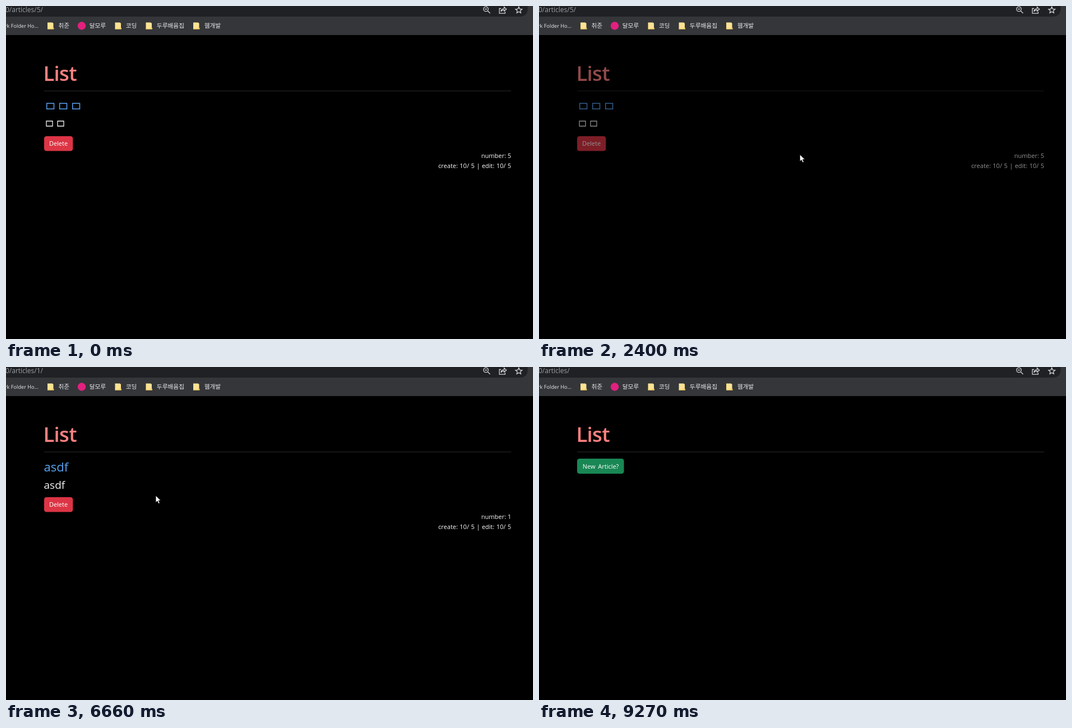
Write an HTML page that moves like this. It is 940 px wide and 596 px high and loops after 9.74 s.

```html
<!DOCTYPE html>
<html lang="ko">
<head>
<meta charset="utf-8">
<title>Articles</title>
<style>
html, body { margin: 0; width: 100%; height: 100%; overflow: hidden; background: #000; }
svg { display: block; width: 940px; height: 596px; }
text { font: 11px "Open Sans", "Noto Sans", sans-serif; fill: #fff; white-space: pre; }
.mid { text-anchor: middle; }
.end { text-anchor: end; }
.gap { word-spacing: 1px; }
.gap2 { word-spacing: 2px; }
.url { font-size: 12px; fill: #9aa0a6; }
.mark { font: 10.7px "Noto Sans CJK KR", "Noto Sans CJK", sans-serif; fill: #e8eaed; }
.tab { font-size: 9.2px; fill: #e8eaed; }
.h1 { font-size: 36.5px; font-weight: 600; letter-spacing: -.7px; fill: #ff8080; }
.name { font-size: 22px; fill: #5aa2f2; }
.body { font-size: 19px; fill: #f4f4f4; }
.warn { font-size: 13.6px; font-weight: 700; fill: #ff8080; }
.dark { fill: #212529; }
.hr { stroke: #2c2c2c; stroke-width: 1; }
.icon { fill: none; stroke: #d0d3d7; stroke-width: 1.3; }
</style>
</head>
<body>
<svg viewBox="0 0 940 596">
  <defs>
    <g id="folder">
      <path d="M0 0H8.5L10.5 1.5V12H0Z" fill="#fde293"/>
      <path d="M8 9.5H11.5V12H0V11H8Z" fill="#f5cb58"/>
    </g>
    <clipPath id="view"><rect y="52" width="940" height="544"/></clipPath>
  </defs>
  <rect width="940" height="596"/>

  <g id="page">
    <text class="h1" x="66.5" y="134">List</text>
    <path class="hr" d="M68 152H901"/>

    <g id="detail">
      <g id="boxes" fill="none">
        <path d="M72.7 174.2h12.8v10h-12.8zm23 0h12.8v10h-12.8zm23 0h12.8v10h-12.8z" stroke="#5aa2f2" stroke-width="1.5"/>
        <path d="M72 206h11v9h-11zm20 0h11v9h-11z" stroke="#f4f4f4" stroke-width="1.3"/>
      </g>
      <g id="words">
        <text class="name" x="67.5" y="187">asdf</text>
        <text class="body" x="67.5" y="218">asdf</text>
      </g>
      <rect id="ring" x="65.5" y="230.5" width="56" height="31.5" rx="6.5" fill="#e15361" opacity=".5"/>
      <rect id="del" x="68" y="233" width="51.3" height="26.5" rx="4.3"/>
      <text class="mid" x="93.5" y="250">Delete</text>
      <text class="end" id="num" x="901" y="272"></text>
      <text class="end" x="901" y="289.5" style="word-spacing:.6px">create: 10/ 5 | edit: 10/ 5</text>
    </g>

    <g id="item">
      <text class="name" x="67.5" y="187">asdf</text>
      <rect id="watch" x="68" y="208.5" width="84" height="27.5" rx="4.3"/>
      <text class="mid gap2 dark" x="110" y="226">Watch Detail</text>
      <path class="hr" d="M68 247.3H901"/>
    </g>
    <g id="add">
      <rect x="68" y="259.5" width="83.5" height="27" rx="4.3" fill="#198754"/>
      <text class="mid gap2" x="110" y="277">New Article?</text>
    </g>
  </g>

  <rect id="shade" y="52" width="940" height="544"/>

  <g clip-path="url(#view)">
    <g id="modal">
      <g id="card">
        <rect x="307" y="72.3" width="355" height="136.2" rx="5.5" fill="#fff"/>
        <path d="M307 117.3H662M307 157.5H662" stroke="#dee2e6" stroke-width=".9"/>
        <text class="warn" x="318" y="101">Warning</text>
        <path d="M639.5 89.5l10.4 10.4m0-10.4l-10.4 10.4" stroke="#6b6b6b" stroke-width="1.5"/>
        <text class="gap dark" x="318" y="142">Do you really want to delete it?</text>
        <rect id="no" x="616" y="170" width="34.5" height="27" rx="4.3"/>
        <text class="mid" x="633.2" y="187.5">No</text>
      </g>
      <rect id="yes" x="575.3" y="170" width="35.4" height="27" rx="4.3"/>
      <text class="mid" id="yesText" x="593" y="187.5">Yes</text>
    </g>
  </g>

  <g id="browser">
    <rect width="940" height="52" fill="#35363a"/>
    <path d="M0 0H930.5V4Q930.5 19 916 19H0Z" fill="#202124"/>
    <text class="url" id="url" x="-1" y="11"></text>
    <g class="icon">
      <circle cx="856" cy="5.5" r="4.2"/>
      <path d="M859.2 8.7L863.5 13M854 5.5H858"/>
      <path d="M883 4.5H880V13.2H890.3V10M882.8 9.8Q883.5 4.8 888.5 4.6V1.8L892.6 5.6L888.5 9V6.8Q884.8 6.8 882.8 9.8Z"/>
      <path d="M914.7 1.4L916.4 5.3L920.5 5.7L917.4 8.4L918.3 12.4L914.7 10.3L911.1 12.4L912 8.4L908.9 5.7L913 5.3Z"/>
    </g>
    <text class="tab end" x="58" y="39">rk Folder Ho...</text>
    <use href="#folder" x="74" y="29.5"/><text class="mark" x="93.5" y="39">취준</text>
    <circle cx="135" cy="35.5" r="7.2" fill="#e3207f"/><text class="mark" x="148.7" y="39">달모루</text>
    <use href="#folder" x="194.5" y="29.5"/><text class="mark" x="213.7" y="39">코딩</text>
    <use href="#folder" x="249.5" y="29.5"/><text class="mark" x="268.8" y="39">두루배움집</text>
    <use href="#folder" x="334" y="29.5"/><text class="mark" x="353.7" y="39">웹개발</text>
  </g>

  <g id="cursor" fill="#fff" stroke="#000" stroke-width=".9" stroke-linejoin="round">
    <path id="arrow" d="M0 0V12.7L3 10L5 14.6L7.3 13.6L5.3 9.1H9.2Z"/>
    <path id="hand" d="M-1.3 1Q0 -1 1.3 1V6Q2.6 5 3.8 6.3Q5 5.5 6 6.8Q8 6.2 8 8.2V12Q8 14 6.6 16H-.8Q-1.6 13.5 -4.4 9.6Q-4.6 7.6 -2.8 8.4L-1.3 10Z"/>
  </g>
</svg>
<script>
const LOOP = 9740, ENTER = 190, LEAVE = 9260;
const $ = id => document.getElementById(id);
const clamp = v => Math.max(0, Math.min(1, v));
const show = (id, on) => $(id).style.display = on ? "" : "none";
const glide = k => (k + k * k * (3 - 2 * k)) / 2;
const easeOut = k => 1 - Math.pow(1 - clamp(k), 1.7);

// Pointer moves: from ms, to ms, end point, optional sag of the path
const moves = [
  [190, 900, 104, 245], [1020, 1610, 609.5, 173.5], [1680, 1820, 632, 182],
  [2100, 2950, 112, 245, 75], [3300, 3505, 543, 240], [3580, 3920, 594, 181],
  [4640, 5050, 302, 297], [5120, 5850, 120, 220], [6600, 6660, 267, 230],
  [6730, 7060, 108, 246], [7300, 8060, 580.5, 179], [8130, 8250, 593, 183],
  [8450, 8600, 646, 228], [8660, LEAVE, 905, 600]
];

const pages = [
  { from: 0, id: 5 }, { from: 4400, items: 1 }, { from: 6300, id: 1 }, { from: 8450, items: 0 }
];

const dialogs = [
  { click: 930, end: 2080, fades: true }, { click: 3245, end: 4400 }, { click: 7130, end: 8450 }
];
const FADE_OUT = 450;

// Normal and hover colour
const buttons = {
  del: ["#dc3545", "#bb2d3b"],
  watch: ["#f8f9fa", "#d3d4d5"],
  yes: ["#0d6efd", "#0962e6"],
  no: ["#6c757d", "#5c636a"]
};

function pointer(t) {
  let x = 520, y = 540;
  for (const [from, to, x1, y1, sag = 0] of moves) {
    if (t < from) break;
    const k = glide(clamp((t - from) / (to - from)));
    x += (x1 - x) * k;
    y += (y1 - y) * k + sag * Math.sin(Math.PI * k);
  }
  return [x, y];
}

const pageAt = t => pages.filter(p => p.from <= t).pop();

function dialogAt(t) {
  const d = dialogs.find(d => t >= d.click && t < d.end + (d.fades ? FADE_OUT : 0));
  if (!d) return { shade: 0, alpha: 0, drop: 0 };
  const age = t - d.click, slide = age - 160, out = t - d.end;
  if (out >= 0) return {
    shade: 1 - clamp((out - 300) / 150), alpha: 1 - clamp(out / 150), drop: 1 - easeOut(out / 300)
  };
  return {
    open: true, opening: slide < 300, shade: clamp(age / 150),
    alpha: clamp(slide / 150), drop: easeOut(slide / 300)
  };
}

function hit(t) {
  const [px, py] = pointer(t), page = pageAt(t);
  const live = dialogAt(t).open ? ["yes", "no"] : page.id ? ["del"] : page.items ? ["watch"] : [];
  return live.find(id => {
    const [x, y, w, h] = ["x", "y", "width", "height"].map(key => +$(id).getAttribute(key));
    return px >= x && px <= x + w && py >= y && py <= y + h;
  });
}

function draw(time) {
  const t = Math.max(0, time) % LOOP, page = pageAt(t), box = dialogAt(t);
  const over = hit(t), hover = hit(Math.max(0, t - 40)), [x, y] = pointer(t);
  const focus = box.opening || (t > dialogs[0].end + FADE_OUT && t < dialogs[1].click);

  show("detail", page.id);
  show("boxes", page.id === 5);
  show("words", page.id === 1);
  show("item", page.items);
  show("add", !page.id);
  show("ring", focus);
  $("add").setAttribute("transform", `translate(0 ${page.items ? 0 : -95.5})`);
  $("num").textContent = "number: " + page.id;
  $("url").textContent = "0/articles/" + (page.id ? page.id + "/" : "");

  for (const id in buttons) {
    const lit = hover === id || (id === "del" && focus);
    $(id).setAttribute("fill", buttons[id][lit ? 1 : 0]);
  }

  $("shade").setAttribute("opacity", box.shade / 2);
  show("modal", box.alpha > 0);
  $("modal").setAttribute("transform", `translate(0 ${-36 * (1 - box.drop)})`);
  $("card").setAttribute("opacity", box.alpha);
  $("yesText").setAttribute("opacity", box.alpha);
  $("yes").setAttribute("opacity", Math.min(1, box.alpha * 1.4));

  show("cursor", t >= ENTER && t < LEAVE);
  show("hand", over);
  show("arrow", !over);
  $("cursor").setAttribute("transform", `translate(${x} ${y})`);
}

const begin = performance.now();
function tick() {
  draw(performance.now() - begin);
  requestAnimationFrame(tick);
}
tick();
</script>
</body>
</html>
```
